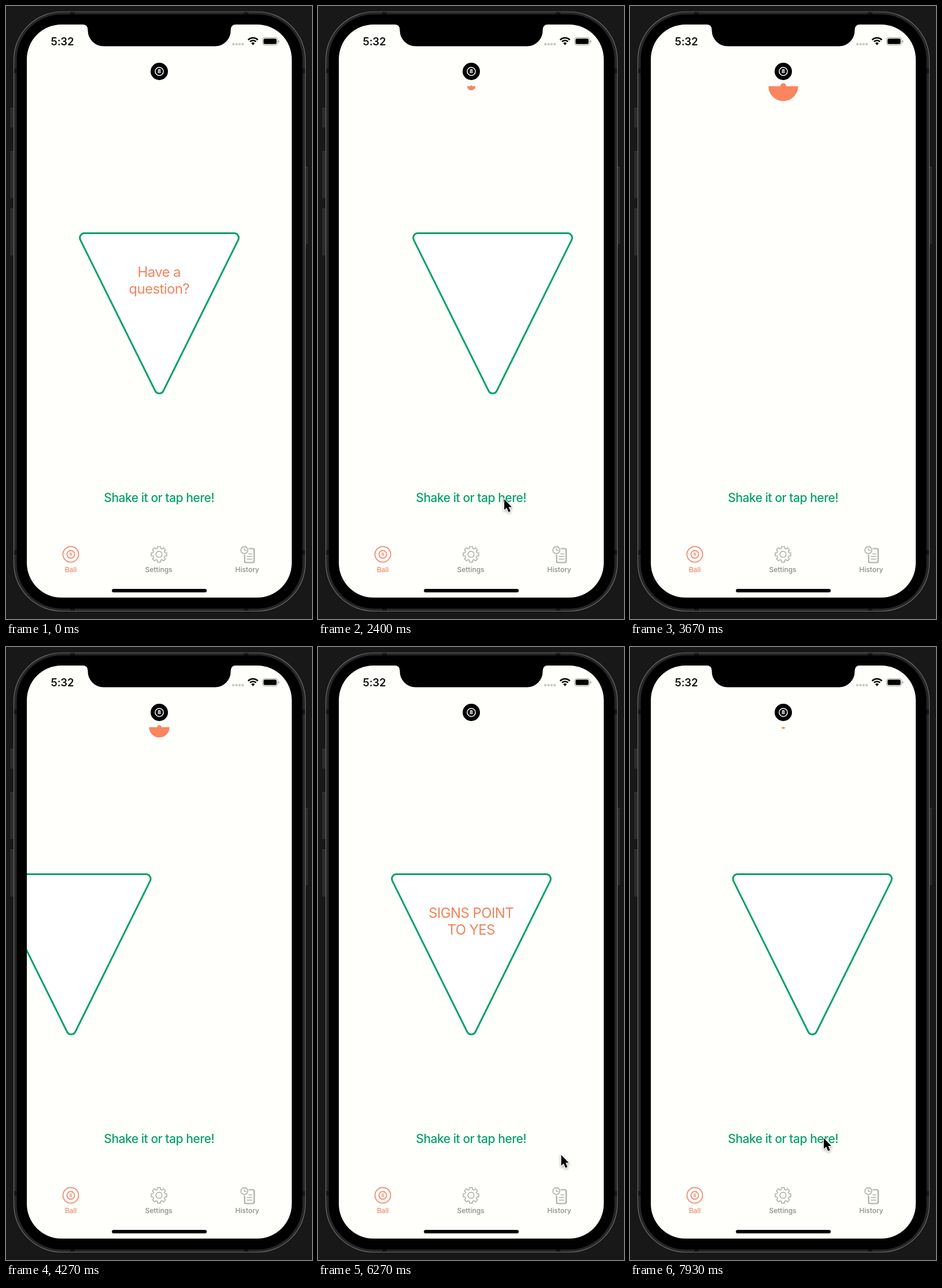
Animation of 529 by 1059 pixels, one loop 8000 ms. Source, as an HTML page with a canvas:

```html
<!DOCTYPE html>
<html lang="en">
<head>
<meta charset="utf-8">
<title>Answer ball</title>
<style>
html, body { margin: 0; width: 100%; height: 100%; overflow: hidden; background: #181818; }
canvas { display: block; width: 529px; height: 1059px; }
</style>
</head>
<body>
<canvas id="stage"></canvas>
<script>
const W = 529, H = 1059, LOOP = 8000;
const GREEN = '#07a06d', ORANGE = '#ee845e', LOADER = '#fb855f', TAB = '#f0957d';
const GRAY = '#b8b7b5', LABEL = '#8b8a88', PAPER = '#fffffb';
const FONT = 'Inter, Roboto, "Liberation Sans", sans-serif';

const canvas = document.getElementById('stage');
const ctx = canvas.getContext('2d');
const dpr = window.devicePixelRatio || 1;
canvas.width = W * dpr;
canvas.height = H * dpr;

const clamp = v => Math.max(0, Math.min(1, v));
const span = (t, a, b) => clamp((t - a) / (b - a));
const smooth = p => p * p * (3 - 2 * p);
const mix = (a, b, p) => a + (b - a) * p;

function rect(x, y, w, h, r, fill, stroke, lw = 1) {
  ctx.beginPath();
  ctx.roundRect(x, y, w, h, r);
  paint(fill, stroke, lw);
}

function disc(x, y, r, fill, stroke, lw = 1) {
  ctx.beginPath();
  ctx.arc(x, y, r, 0, Math.PI * 2);
  paint(fill, stroke, lw);
}

function line(points, stroke, lw) {
  ctx.beginPath();
  points.forEach(([x, y]) => ctx.lineTo(x, y));
  paint(null, stroke, lw);
}

function paint(fill, stroke, lw) {
  if (fill) { ctx.fillStyle = fill; ctx.fill(); }
  if (stroke) { ctx.strokeStyle = stroke; ctx.lineWidth = lw; ctx.stroke(); }
}

function text(str, x, y, size, weight, color, spacing = 0, alpha = 1) {
  ctx.save();
  ctx.globalAlpha = alpha;
  ctx.font = `${weight} ${size}px ${FONT}`;
  ctx.letterSpacing = spacing + 'px';
  ctx.textAlign = 'center';
  ctx.fillStyle = color;
  ctx.fillText(str, x + spacing / 2, y);
  ctx.restore();
}

function drawPhone() {
  ctx.fillStyle = '#181818';
  ctx.fillRect(0, 0, W, H);
  for (const [x, y, w, h] of [[7, 176, 7, 34], [7, 251, 7, 81], [7, 350, 7, 81], [516, 278, 6, 133]]) {
    rect(x, y, w, h, 1.5, '#2b2b2b');
    ctx.fillStyle = '#3d3d3d';
    ctx.fillRect(x, y, w, 1);
  }
  rect(13.5, 10, 504, 1035.5, 83, '#262626', '#6a6a6a', 1.2);
  ctx.fillStyle = '#141414';
  for (const x of [111, 411]) {
    ctx.fillRect(x, 10.5, 8, 5);
    ctx.fillRect(x, 1040, 8, 5);
  }
  for (const y of [108, 940]) {
    ctx.fillRect(14, y, 5, 8);
    ctx.fillRect(512, y, 5, 8);
  }
  rect(18.5, 14.5, 494, 1026.5, 78, '#000');
}

function screenPath() {
  ctx.beginPath();
  ctx.roundRect(36, 32, 458, 990, 60);
}

function drawNotch() {
  ctx.beginPath();
  ctx.moveTo(133, 31);
  ctx.lineTo(133, 32);
  ctx.quadraticCurveTo(141, 32, 141.5, 41);
  ctx.arcTo(141.5, 69.5, 170, 69.5, 27);
  ctx.arcTo(388.5, 69.5, 388.5, 41, 27);
  ctx.lineTo(388.5, 41);
  ctx.quadraticCurveTo(389, 32, 397, 32);
  ctx.lineTo(397, 31);
  paint('#000');
}

function drawStatus() {
  text('5:32', 97.5, 67.5, 18.5, 600, '#111', -0.2);
  for (let i = 0; i < 4; i++) rect(391 + i * 5.35, 64, 4, 4, 1.2, '#c8c8c5');

  // Wi-Fi fan
  const up = -Math.PI / 2;
  ctx.lineCap = 'butt';
  for (const r of [12, 7.5]) {
    ctx.beginPath();
    ctx.arc(427, 67, r, up - 0.78, up + 0.78);
    paint(null, '#000', 2.6);
  }
  ctx.beginPath();
  ctx.moveTo(427, 67.8);
  ctx.arc(427, 67.3, 4.2, up - 0.78, up + 0.78);
  ctx.closePath();
  paint('#000');

  rect(443.5, 54.5, 26, 13, 4, null, '#a3a3a1', 1.1);
  rect(445.2, 56.2, 22.6, 9.6, 2.5, '#000');
  rect(470.7, 59, 1.6, 4.4, 1, '#a3a3a1');
}

function drawGear(x, y) {
  const teeth = 8, step = Math.PI * 2 / teeth;
  ctx.beginPath();
  for (let i = 0; i < teeth; i++) {
    const a = i * step - Math.PI / 2;
    for (const [da, r] of [[-0.27, 10.6], [-0.19, 13.7], [0.19, 13.7], [0.27, 10.6]]) {
      ctx.lineTo(x + r * Math.cos(a + da), y + r * Math.sin(a + da));
    }
  }
  ctx.closePath();
  paint(null, GRAY, 1.8);
  disc(x, y, 5.3, null, GRAY, 1.8);
}

function drawHistory() {
  rect(412.5, 937.5, 16.5, 24, 2.5, null, '#acabaa', 2.2);
  for (const [x, y] of [[420, 946.5], [417, 951], [417, 955.5]]) {
    line([[x, y], [425, y]], '#acabaa', 1.7);
  }
  disc(412, 940, 8, PAPER);
  disc(412, 940, 6, null, GRAY, 1.8);
  line([[412, 936], [412, 940.5], [416, 940.5]], GRAY, 1.5);
}

function drawTabs() {
  ctx.lineJoin = ctx.lineCap = 'round';
  disc(112, 947.3, 13.5, null, TAB, 2);
  disc(112, 947.3, 6.6, null, TAB, 2);
  text('8', 112, 950.1, 7.5, 800, TAB);
  drawGear(264.5, 947.3);
  drawHistory();
  text('Ball', 112, 978, 12, 500, '#ef8b6a');
  text('Settings', 264, 978, 12, 500, LABEL);
  text('History', 417, 978, 12, 500, LABEL);
  rect(183, 1007, 164, 6, 3, '#000');
}

function drawBadge() {
  disc(265, 113, 15, '#000');
  disc(265, 113, 7.1, null, '#fff', 1.5);
  text('8', 265, 116.3, 9, 800, '#fff');
}

function drawTriangle(dx) {
  const left = 122.8 + dx, right = 407.2 + dx, mid = 265 + dx;
  ctx.beginPath();
  ctx.moveTo(mid, 392.5);
  ctx.arcTo(right, 392.5, mid, 679.2, 8);
  ctx.arcTo(mid, 679.2, left, 392.5, 8);
  ctx.arcTo(left, 392.5, mid, 392.5, 8);
  ctx.closePath();
  paint('#fff', GREEN, 3);
}

function drawLoader(r) {
  if (r <= 0) return;
  ctx.beginPath();
  ctx.arc(265, 138.5, r, 0, Math.PI);
  ctx.closePath();
  paint(LOADER);
  disc(265, 138.5, r * 0.2, LOADER);
}

function drawCursor(x, y) {
  ctx.save();
  ctx.translate(x, y);
  ctx.lineJoin = 'miter';
  ctx.beginPath();
  for (const [px, py] of [[0, 0], [0, 18.6], [4.2, 14.7], [7.4, 22.2], [10.8, 20.7], [7.6, 13.4], [13, 13.4]]) {
    ctx.lineTo(px, py);
  }
  ctx.closePath();
  ctx.shadowColor = 'rgba(0,0,0,.4)';
  ctx.shadowBlur = 4 * dpr;
  ctx.shadowOffsetY = 1.5 * dpr;
  paint(null, '#fff', 2.2);
  ctx.shadowColor = 'transparent';
  paint('#000');
  ctx.restore();
}

// Leaves to the right, comes back from the left.
function triangleX(t) {
  const k = 2.19e-4;
  if (t >= 7452) return k * (t - 7452) ** 2;
  if (t < 1990 || t > 5105) return 0;
  return t < 3547 ? k * (t - 1990) ** 2 : -k * (5105 - t) ** 2;
}

function loaderRadius(t) {
  const start = t > 7000 ? 7827 : 2150;
  const p = (t - start) / 2790;
  return p > 0 && p < 1 ? 26 * Math.sin(Math.PI * p) : 0;
}

function buttonAlpha(t) {
  for (const [down, up] of [[930, 1990], [7200, 7452]]) {
    if (t >= down && t < up + 250) return mix(0.24, 1, span(t, up, up + 250));
  }
  return 1;
}

function cursorAt(t) {
  if (t < 70 || (t >= 3400 && t < 5800)) return null;
  if (t < 3400) {
    const p = smooth(span(t, 70, 870));
    return [mix(508, 322, p), mix(409, 852, p)];
  }
  if (t < 6300) {
    const p = smooth(span(t, 5800, 6230));
    return [mix(471, 420.5, p), mix(905, 877.5, p)];
  }
  const p = smooth(span(t, 6330, 7130));
  return [mix(420.5, 335, p), mix(877.5, 848.5, p)];
}

function drawMessage(t) {
  const first = t < 3500;
  const alpha = first ? 1 - span(t, 1990, 2220) : span(t, 5105, 5450) - span(t, 7452, 7680);
  if (alpha <= 0) return;
  const lines = first ? ['Have a', 'question?'] : ['SIGNS POINT', 'TO YES'];
  lines.forEach((s, i) => text(s, 265 + triangleX(t), 467.7 + i * 29.2, 24, 400, ORANGE, -0.6, alpha));
}

function render(t) {
  ctx.setTransform(dpr, 0, 0, dpr, 0, 0);
  drawPhone();
  ctx.save();
  screenPath();
  ctx.clip();
  ctx.fillStyle = PAPER;
  ctx.fillRect(36, 32, 458, 990);
  drawTriangle(triangleX(t));
  drawMessage(t);
  drawLoader(loaderRadius(t));
  drawBadge();
  drawStatus();
  text('Shake it or tap here!', 265, 856.5, 21, 500, GREEN, -0.48, buttonAlpha(t));
  drawTabs();
  ctx.restore();
  drawNotch();
  const cursor = cursorAt(t);
  if (cursor) drawCursor(...cursor);
}

const began = performance.now();
function tick() {
  render((performance.now() - began) % LOOP);
  requestAnimationFrame(tick);
}
tick();
</script>
</body>
</html>
```
